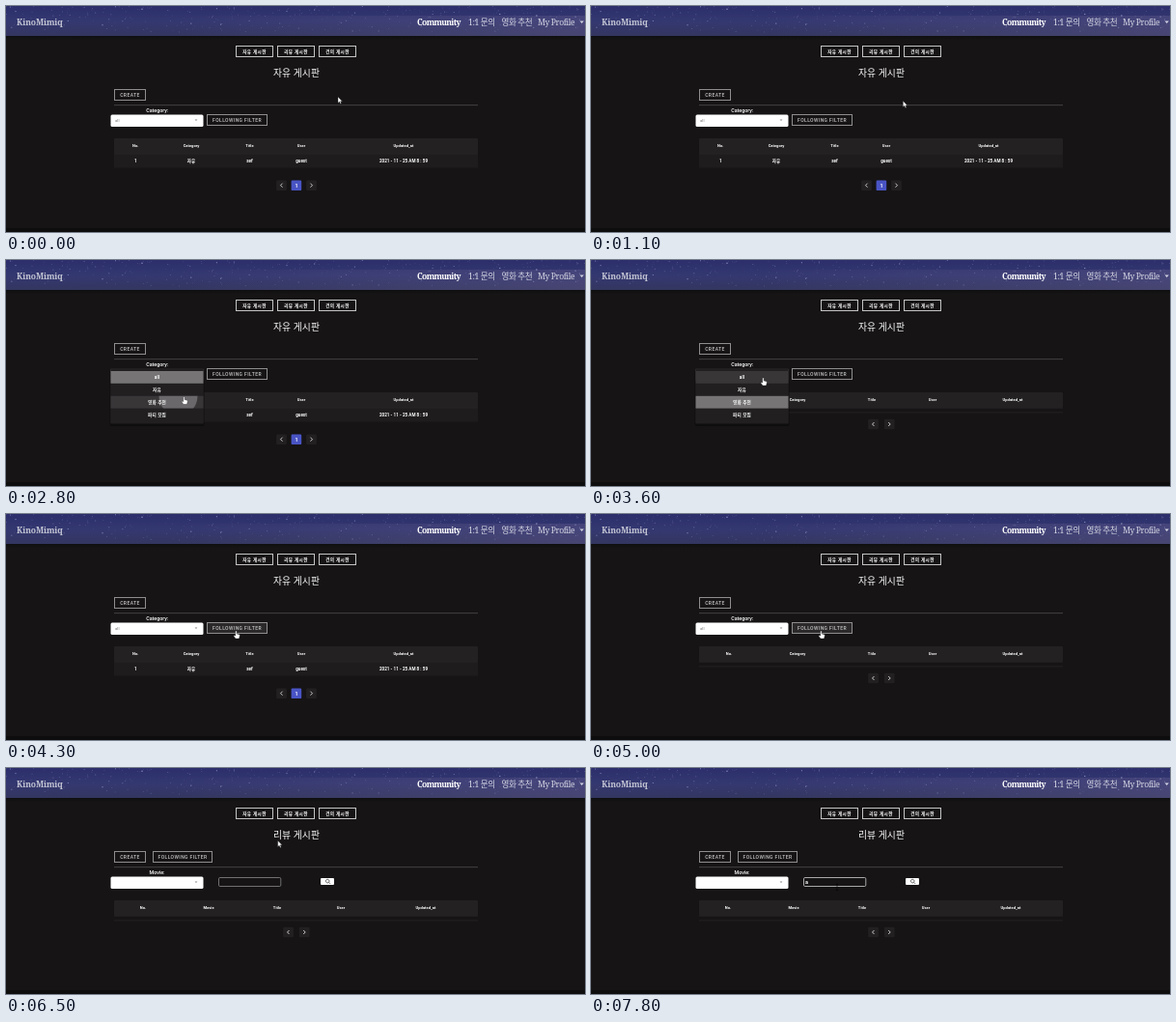
Write an HTML page that moves like this. It is 600x234 px and loops after 8 s.

```html
<!DOCTYPE html>
<html lang="ko">
<head>
<meta charset="utf-8">
<title>Community board</title>
<style>
  html, body { margin: 0; width: 100%; height: 100%; overflow: hidden; background: #161415; }
  svg { display: block; width: 100vw; height: 100vh; }
  text { font-family: Roboto, "Noto Sans CJK KR", "Noto Sans CJK", sans-serif; white-space: pre; }
  .nav text { font-family: "Noto Serif", "Noto Sans CJK KR", "Noto Sans CJK", serif; }
</style>
</head>
<body>
<svg viewBox="0 0 600 234">
  <defs>
    <linearGradient id="sky" x2="0" y2="1">
      <stop offset="0" stop-color="#2b2e6a"/>
      <stop offset=".5" stop-color="#343871"/>
      <stop offset="1" stop-color="#33365f"/>
    </linearGradient>
    <linearGradient id="haze">
      <stop offset=".3" stop-color="#6a6090" stop-opacity="0"/>
      <stop offset="1" stop-color="#6a6090" stop-opacity=".35"/>
    </linearGradient>
    <linearGradient id="shade" x2="0" y2="1">
      <stop offset="0" stop-color="#0f0e10"/>
      <stop offset="1" stop-color="#161415"/>
    </linearGradient>
    <clipPath id="row"><rect x="108.5" y="140.8" width="96" height="12.8"/></clipPath>
  </defs>
  <rect width="600" height="234" fill="#161415"/>
  <rect y="31" width="600" height="4" fill="url(#shade)"/>
  <rect y="230" width="600" height="4" fill="#0e0d0e"/>
  <rect width="600" height="31" fill="url(#sky)"/>
  <rect y="10" width="600" height="21" fill="url(#haze)"/>
  <g id="stars" fill="#c3c8f2"></g>
  <g id="nav" class="nav"></g>
  <g id="page"></g>
</svg>
<script>
const LOOP = 8000, STEP = 100;
const $ = id => document.getElementById(id);

const text = (str, x, y, size, { anchor = 'middle', weight = 400, fill = '#fff', gap = 0 } = {}) =>
  `<text x="${x}" y="${y}" font-size="${size}" text-anchor="${anchor}" font-weight="${weight}" fill="${fill}" letter-spacing="${gap}">${str}</text>`;
const rect = (x, y, w, h, fill, extra = '') =>
  `<rect x="${x}" y="${y}" width="${w}" height="${h}" fill="${fill}" ${extra}/>`;
const path = (d, extra) => `<path d="${d}" ${extra}/>`;

function drawHeader() {
  let seed = 11;
  const random = () => (seed = seed * 16807 % 2147483647) / 2147483647;
  let stars = '';
  for (let i = 0; i < 320; i++) {
    const x = random() * 600, y = random() ** 1.4 * 27;
    stars += `<circle cx="${x.toFixed(1)}" cy="${y.toFixed(1)}" r="${(.3 + random() ** 4 * .4).toFixed(2)}" opacity="${(.2 + random() * .5).toFixed(2)}"/>`;
  }
  $('stars').innerHTML = stars;
  const item = (str, x, gap, fill = '#d3d4e2', weight = 500) =>
    text(str, x, 20, 8.6, { anchor: 'start', gap, fill, weight });
  $('nav').innerHTML = item('KinoMimiq', 11, -.1, '#c3c4d3', 600) +
    item('Community', 426, -.68, '#fff', 700) + item('1:1 문의', 479, -.4) +
    item('영화 추천', 513.5, -.4) + item('My Profile', 551, -.45) +
    path('M594.5 15.5h4.4l-2.2 2.4z', 'fill="#d3d4e2"');
}

// time, x, y of the pointer's hot spot
const route = [
  [0, 344, 94], [700, 344, 94], [800, 341, 94], [1000, 336, 96], [1400, 255, 110],
  [1800, 192, 119], [2100, 192, 119], [2400, 188, 131], [2700, 184.5, 141.5],
  [2900, 184.5, 141.5], [3200, 182, 118], [3400, 181, 118], [3600, 178.5, 122],
  [3800, 178.5, 122], [4200, 238.5, 121], [5300, 238.5, 121], [5600, 294, 57],
  [5800, 299, 47], [6200, 299, 47], [6900, 255, 118.5]
];
function pointerAt(t) {
  const next = route.findIndex(p => p[0] > t);
  if (next < 0) return route.at(-1).slice(1);
  const [t0, x0, y0] = route[next - 1], [t1, x1, y1] = route[next];
  const k = (t - t0) / (t1 - t0), e = k * k * (3 - 2 * k);
  return [x0 + (x1 - x0) * e, y0 + (y1 - y0) * e];
}
const inside = ([x, y], left, top, w, h) => x >= left && x <= left + w && y >= top && y <= top + h;

function button(label, x, y, w, mouse, board) {
  const hover = inside(mouse, x, y, w, 12);
  const style = board ? { weight: 600, gap: .38 } : { weight: 500, gap: .42, fill: '#c4c3c4' };
  return rect(x, y, w, 11, hover ? '#2b292a' : 'none', `stroke="${board ? '#c4c4c4' : '#8f8e8f'}"`) +
    text(label, x + w / 2, y + 7.4, board ? 4.6 : 5, style);
}

function pager(y, centers, current) {
  const chevron = (x, dir) => rect(x - 5.4, y - 5.3, 10.8, 10.6, '#222021', 'rx="1"') +
    path(`M${x - dir} ${y - 2}l${2 * dir} 2l${-2 * dir} 2`, 'fill="none" stroke="#ddd" stroke-width=".9"');
  return chevron(centers[0], -1) + chevron(centers[1], 1) +
    (current ? rect(295.6, y - 5.2, 10.6, 10.6, '#4954c4', 'rx="1.2"') + text('1', 301, y + 1.9, 5.4, { weight: 700 }) : '');
}

function table(kind, columns, filled) {
  const cells = (labels, y, size) => labels.map((s, i) =>
    text(s, columns[i], y, size, { weight: 700 })).join('');
  const head = cells(['No.', kind, 'Title', 'User', 'Updated_at'], 146.3, 4.1);
  let out = rect(112, 137, 377, 16, '#232122', 'rx="1"') + head;
  if (filled) {
    out += rect(112, 153, 377, 14.5, '#1e1c1d') + rect(112, 152.8, 377, .5, '#2b292a') +
      cells(['1', '자유', 'sef', 'guest', '2021 - 11 - 25 AM 8 : 59'], 162, 4.6);
    return out + pager(185.7, [285.5, 316.5], true);
  }
  return out + rect(112, 153, 377, .5, '#2b292a') + rect(112, 157.6, 377, .6, '#2b292a') +
    pager(170, [292.5, 309.2], false);
}

const select = value => rect(108.5, 112.4, 96, 12.6, '#fff', 'rx="1.5"') +
  text(value, 113, 120.2, 4.3, { anchor: 'start', fill: '#777' }) +
  path('M195.6 117.4h2.8l-1.4 1.6z', 'fill="#888"');

function menu(selected, mouse, age, ripple) {
  const k = Math.min(1, .4 + age / 250);
  const items = ['all', '자유', '영화 추천', '파티 모집'].map((label, i) => {
    const y = 115 + i * 12.9;
    const fill = i === selected ? '#767475' : inside(mouse, 108, y, 97, 12.8) ? '#383637' : 'none';
    const wave = i === 2 && ripple >= 0
      ? `<circle cx="178.5" cy="141" r="${Math.min(20, 8 + ripple * .12)}" fill="#6a686a" clip-path="url(#row)"/>` : '';
    return rect(108.5, y, 96, 12.8, fill) + wave + text(label, 156.5, y + 7.9, 4.6, { weight: 600, gap: .15 });
  }).join('');
  return `<g opacity="${k}">` + rect(107.5, 114, 98, 58, '#0b0a0b', 'rx="2" opacity=".6"') +
    rect(108.2, 112, 96.6, 57.4, '#211f20', 'rx="1"') + items + '</g>';
}

function pointer([x, y], shape) {
  const shapes = {
    arrow: path('M0 0V6.4L1.5 5.1L2.5 7.3L3.5 6.8L2.6 4.7H4.5Z', 'fill="#fff" stroke="#222" stroke-width=".4"'),
    hand: path('M-.8 .6Q0 -.5 .7 .6V3L3.3 3.7Q4 4 3.8 5L3 8H-.6L-2.6 5.2Q-2.6 4.2 -.8 5Z', 'fill="#fff" stroke="#222" stroke-width=".4"'),
    beam: path('M-1.2 1.5H1.2M0 1.5V8M-1.2 8H1.2', 'fill="none" stroke="#050505" stroke-width=".6"')
  };
  return `<g transform="translate(${x.toFixed(2)} ${y.toFixed(2)})">${shapes[shape]}</g>`;
}

function forumPage(t, mouse) {
  const recommended = t >= 2900 && t < 3800;
  const following = t >= 4600 && t < 5100;
  const empty = recommended || following;
  let out = select(recommended ? '영화 추천' : 'all') +
    text('Category:', 156.7, 110, 5.3, { weight: 500 }) +
    button('CREATE', 112.5, 86.5, 32, mouse) +
    button('FOLLOWING FILTER', 208.5, 112.5, 62, mouse) +
    table('Category', empty ? [143, 214, 291, 354, 437] : [134.3, 192, 252.5, 306, 412], !empty);
  if (t >= 2200 && t < 2900) out += menu(0, mouse, t - 2200, t - 2700);
  if (t >= 3300 && t < 3800) out += menu(2, mouse, t - 3300, -1);
  return out;
}

function reviewPage(t, mouse) {
  const focused = t >= 7100;
  return select('') + text('Movie:', 156.5, 110, 5.3, { weight: 500 }) +
    button('CREATE', 112.5, 86.5, 32, mouse) +
    button('FOLLOWING FILTER', 152.5, 86.5, 61, mouse) +
    rect(220.5, 113.5, 64.3, 9, '#161415', `rx="1.3" stroke="${focused ? '#d0d0d0' : '#8a8a8a'}" stroke-width=".8"`) +
    (t >= 7700 ? text('a', 222, 119.9, 5.5, { anchor: 'start', weight: 700 }) : '') +
    rect(326, 114, 14, 7, '#fff', 'rx="1"') +
    path('M334.4 118.4a1.8 1.8 0 1 1 .1 -.1l1.6 1.6', 'fill="none" stroke="#222" stroke-width=".7"') +
    table('Movie', [142, 210, 281, 347, 435], false);
}

function draw(t) {
  const mouse = pointerAt(t), review = t >= 6100;
  const boards = ['자유', '리뷰', '건의'].map((name, i) =>
    button(name + ' 게시판', 238.5 + i * 43, 41.5, 38, mouse, true)).join('');
  const clickable = inside(mouse, 281, 41, 39, 12) ||
    !review && (inside(mouse, 108, 112, 97, 57) || inside(mouse, 208, 112, 63, 12));
  const shape = clickable ? 'hand' : review && inside(mouse, 220, 110, 65, 12) ? 'beam' : 'arrow';
  $('page').innerHTML = boards +
    text((review ? '리뷰' : '자유') + ' 게시판', 301, 73, 9.8, { weight: 500, gap: .1 }) +
    rect(112, 102.4, 377, .7, '#555354') +
    (review ? reviewPage : forumPage)(t, mouse) +
    pointer(mouse, shape);
}

let shown = -1;
function tick() {
  const step = Math.floor(performance.now() % LOOP / STEP);
  if (step !== shown) draw((shown = step) * STEP);
  requestAnimationFrame(tick);
}
drawHeader();
tick();
</script>
</body>
</html>
```
